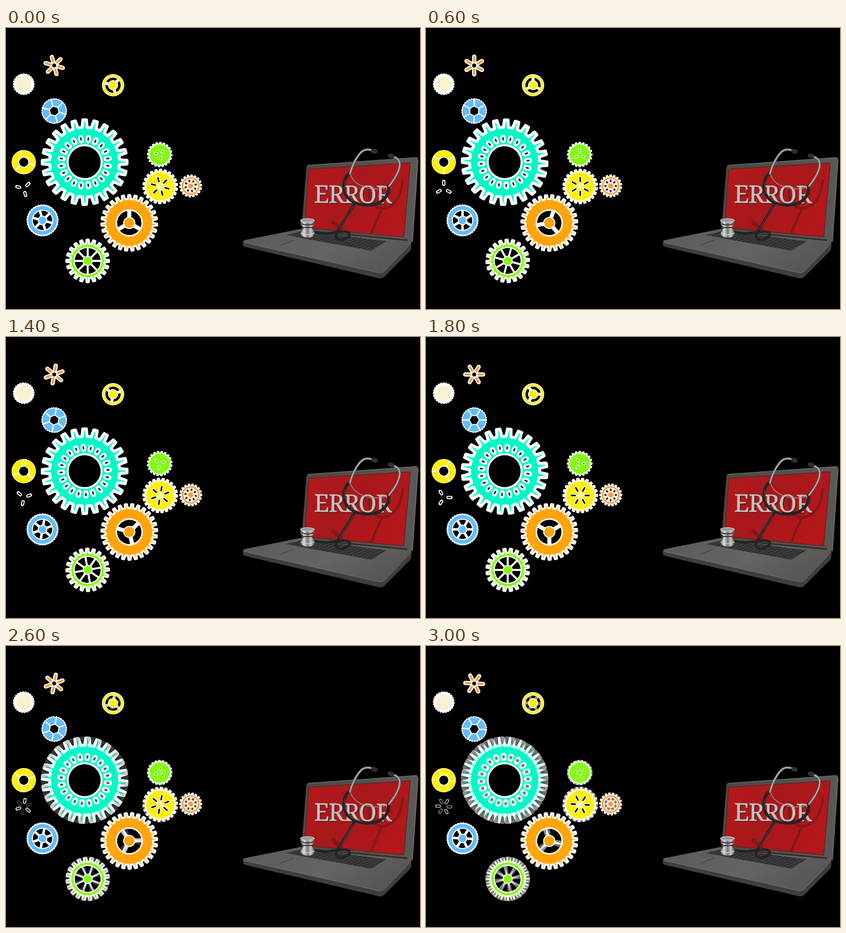
Animation, 816 px wide and 555 px high, one loop 3200 ms. Source, as an HTML page with a canvas:

```html
<!DOCTYPE html>
<html lang="en">
<head>
<meta charset="utf-8">
<title>Gears and laptop</title>
<style>
html, body { margin: 0; width: 100%; height: 100%; overflow: hidden; background: #000; }
canvas, svg { position: absolute; left: 0; top: 0; display: block; }
</style>
</head>
<body>
<canvas id="stage" width="816" height="555"></canvas>
<svg width="816" height="555" viewBox="0 0 816 555" fill="none" stroke-linecap="round" stroke-linejoin="round">
  <defs>
    <linearGradient id="red" x2="1" y2=".5">
      <stop stop-color="#b5191c"/><stop offset=".5" stop-color="#a8181a"/><stop offset="1" stop-color="#b3171a"/>
    </linearGradient>
    <linearGradient id="lid" x2="1"><stop stop-color="#484746"/><stop offset="1" stop-color="#5b5958"/></linearGradient>
    <linearGradient id="base" x2="1" y2=".4"><stop stop-color="#5c5a58"/><stop offset=".6" stop-color="#666462"/><stop offset="1" stop-color="#595755"/></linearGradient>
    <linearGradient id="chrome" x2="1">
      <stop stop-color="#555"/><stop offset=".25" stop-color="#ddd"/><stop offset=".5" stop-color="#777"/>
      <stop offset=".72" stop-color="#c8c8c8"/><stop offset="1" stop-color="#444"/>
    </linearGradient>
    <pattern id="keys" width="9" height="6" patternUnits="userSpaceOnUse" patternTransform="matrix(1 .16 -.9 .42 552 408)">
      <rect width="9" height="6" fill="#4c4a49"/><rect x="1" y="1" width="7.4" height="4.4" fill="#292828"/>
    </pattern>
    <clipPath id="screen"><path d="M597 279L797 266L784 413L589 394Z"/></clipPath>
  </defs>

  <!-- Lid and screen -->
  <path d="M597 270L808 255Q813 255 812 261L801 422L582 402L592 276Q593 271 597 270Z" fill="url(#lid)"/>
  <path d="M812 261L801 422" stroke="#686664" stroke-width="2"/>
  <path d="M594 272L809 256" stroke="#6c6968"/>
  <path d="M597 279L797 266L784 413L589 394Z" fill="url(#red)" stroke="#482020"/>
  <g clip-path="url(#screen)" stroke="#76191a" stroke-width="5" opacity=".75">
    <path d="M716 318C712 352 739 366 762 348C775 338 780 318 782 301"/>
    <path d="M740 358L722 400L716 416"/>
    <path d="M645 384L660 397" stroke-width="8"/>
  </g>

  <!-- Base -->
  <path d="M467 421L467 429Q469 432 474 433L734 494Q741 496 746 491L796 441Q800 437 799 421Z" fill="#403e3d"/>
  <path d="M470 419L580 397L799 420Q799 426 795 429L746 480Q741 485 733 483L470 424Q465 422 470 419Z" fill="url(#base)"/>
  <path d="M470 424L733 483Q741 485 746 480L795 429" stroke="#777572"/>
  <path d="M551 409L588 400L750 421L720 440Z" fill="url(#keys)"/>
  <path d="M541 429L567 419" stroke="#4a4847" stroke-width="1.5"/>
  <path d="M584 400L790 419" stroke="#302f2e" stroke-width="3"/>

  <!-- Lettering -->
  <g font-family="'Noto Serif', 'Liberation Serif', serif" font-size="48" letter-spacing="-1.4" transform="rotate(.5 607 346)">
    <text x="609" y="347" fill="#58191a">ERROR</text>
    <text x="607" y="345" fill="#c5c0bf" stroke="#c5c0bf" stroke-width=".5">ERROR</text>
  </g>

  <!-- Stethoscope -->
  <path d="M679 289Q686 311 718 317Q744 320 755 311" stroke="#98908f" stroke-width="1.5"/>
  <g stroke="#242425" stroke-width="6">
    <path d="M676 288C661 302 664 327 677 338C693 352 724 353 739 343C751 335 755 323 754 311"/>
    <path d="M687 347L654 401C645 414 654 421 667 417C681 411 681 402 666 402C647 402 628 410 609 403" stroke-width="5"/>
  </g>
  <path d="M668 302C665 324 675 342 702 347M684 353L657 397" stroke="#555" stroke-width="1"/>
  <g stroke="#555455" stroke-width="5">
    <path id="pipes" d="M722 242C707 236 699 244 691 257C683 270 680 280 678 288M762 254C775 257 778 265 775 277C772 288 764 301 755 312"/>
  </g>
  <use href="#pipes" stroke="#b3aeae" stroke-width="2.5"/>
  <path d="M724 243L728 244M757 252L761 253" stroke="#303030" stroke-width="9"/>
  <path d="M580 380Q582 377 594 377Q607 377 608 380L607 389L602 394L609 405Q607 414 595 414Q581 413 580 405L588 394L581 389Z" fill="url(#chrome)"/>
  <ellipse cx="594" cy="380" rx="14" ry="3.5" fill="#999" stroke="#ddd"/>
  <path d="M588 394L602 394" stroke="#333" stroke-width="2"/>
  <path d="M582 405Q594 412 607 405" stroke="#d4d4d4" stroke-width="1.5"/>
  <path d="M583 387Q594 391 606 387" stroke="#333" stroke-width="2"/>
</svg>

<script>
const LOOP = 3200, STEP = 200, TAU = Math.PI * 2;
const WHITE = '#fff', BLACK = '#000', TEAL = '#00f7c7', ORANGE = '#ffa408',
  YELLOW = '#fff000', BLUE = '#62bcff', GREEN = '#83fa12', AMBER = '#ff9a38';
const view = document.getElementById('stage').getContext('2d');
const buffer = document.createElement('canvas');
buffer.width = 816;
buffer.height = 555;
const ctx = buffer.getContext('2d');

// Tick and angle of the small wheels.
const TURNS = [[0, 75], [3, -90], [7, -260], [9, -360], [11, -455], [13, -560], [15, -657]];

function wheelAngle(tick) {
  if (tick < 0) return 75 - 48.8 * tick;
  let i = 1;
  while (i < TURNS.length - 1 && TURNS[i][0] < tick) i++;
  const [t0, a0] = TURNS[i - 1], [t1, a1] = TURNS[i];
  return a0 + (a1 - a0) * (tick - t0) / (t1 - t0);
}

function place(x, y, degrees, draw) {
  ctx.save();
  ctx.translate(x, y);
  ctx.rotate(degrees * TAU / 360);
  draw();
  ctx.restore();
}

function disc(r, color) {
  ctx.beginPath();
  ctx.arc(0, 0, r, 0, TAU);
  ctx.fillStyle = color;
  ctx.fill();
}

function cog(n, root, tip, line, fill, edge = WHITE) {
  const pitch = TAU / n;
  ctx.beginPath();
  for (let i = 0; i < n; i++) {
    for (const [r, k] of [[root, -.27], [tip, -.16], [tip, .16], [root, .27]]) {
      const a = (i + k) * pitch;
      ctx.lineTo(r * Math.cos(a), r * Math.sin(a));
    }
  }
  ctx.closePath();
  ctx.lineJoin = 'round';
  ctx.lineWidth = line;
  ctx.strokeStyle = edge;
  ctx.fillStyle = fill;
  ctx.fill();
  ctx.stroke();
}

// Radial bars from r0 to r1.
function bars(n, r0, r1, width, color, cap = 'round') {
  ctx.lineCap = cap;
  ctx.lineWidth = width;
  ctx.strokeStyle = color;
  ctx.beginPath();
  for (let i = 0; i < n; i++) {
    const c = Math.cos(i * TAU / n), s = Math.sin(i * TAU / n);
    ctx.moveTo(r0 * c, r0 * s);
    ctx.lineTo(r1 * c, r1 * s);
  }
  ctx.stroke();
}

function hexagon(r, color, line) {
  ctx.beginPath();
  for (let i = 0; i < 6; i++) ctx.lineTo(r * Math.cos(i * TAU / 6), r * Math.sin(i * TAU / 6));
  ctx.closePath();
  ctx.fillStyle = color;
  ctx.fill();
  ctx.lineWidth = line;
  ctx.strokeStyle = WHITE;
  ctx.stroke();
}

function spoked(n, r, hub, width, hubColor) {
  disc(r, BLACK);
  bars(n, 0, r + 1, width, WHITE, 'butt');
  disc(hub + 2, WHITE);
  disc(hub, hubColor);
}

function drawGears(tick) {
  const small = wheelAngle(tick);
  ctx.clearRect(0, 0, 816, 555);

  place(95, 74, small, () => {
    bars(6, 8, 17.5, 8.5, WHITE);
    bars(6, 8, 17, 4.2, AMBER);
    hexagon(5.5, BLACK, 2);
  });
  place(35, 111, small, () => {
    cog(24, 19, 20.5, 2, WHITE);
    disc(15.5, '#f8f1d4');
  });
  place(211, 113, small, () => {
    disc(22, '#fff9a8');
    disc(20, '#fbe92c');
    disc(16.5, '#fff9a8');
    spoked(3, 15, 8, 6, YELLOW);
  });
  place(95, 164, small, () => {
    cog(30, 24, 25, 1, WHITE);
    disc(23, BLUE);
    bars(6, 9, 24, 2.5, WHITE, 'butt');
    hexagon(10, BLACK, 2);
  });
  place(155, 265, -90 - 4.3 * tick, () => {
    cog(24, 69, 83.5, 6, TEAL);
    ctx.rotate(TAU / 40);
    bars(20, 43, 49, 10.5, WHITE);
    bars(20, 44.5, 48, 3.2, '#10302c');
    disc(35.5, WHITE);
    disc(31.5, BLACK);
  });
  place(35, 265, small + 60, () => {
    disc(24, '#fff7a0');
    disc(22.5, YELLOW);
    bars(3, 9, 24, 2.5, WHITE, 'butt');
    disc(11, WHITE);
    disc(9, BLACK);
  });
  place(35, 317, small, () => {
    bars(3, 8.5, 14, 6.5, WHITE);
    bars(3, 8.5, 13.5, 2.6, BLACK);
  });
  place(72, 380, small, () => {
    cog(36, 30, 31, 1.5, WHITE);
    disc(28.5, BLUE);
    disc(21, WHITE);
    spoked(6, 19, 7.5, 5, BLUE);
  });
  place(243, 385, -90 + 6.6 * tick, () => {
    cog(27, 47, 55, 4, ORANGE);
    disc(27, WHITE);
    spoked(3, 24, 10, 8, ORANGE);
  });
  place(161, 460, -90 + 5 * tick, () => {
    cog(20, 34, 42, 4, GREEN);
    disc(28, WHITE);
    spoked(8, 25.5, 8, 4, GREEN);
  });
  place(303, 250, small, () => {
    cog(20, 21, 24, 2.5, GREEN);
    bars(3, 6, 10, 5, '#e8ffd0');
    bars(3, 6.5, 9.5, 2, '#5f9b2c');
  });
  place(304, 313, small, () => {
    cog(22, 29, 33.5, 3.5, YELLOW);
    bars(6, 9, 18, 6, '#fffbd0');
    bars(6, 10, 17.5, 3, BLACK);
    disc(6, '#fff3a0');
  });
  place(364, 312, small, () => {
    cog(18, 18, 21.5, 2.5, '#fff4e8');
    ctx.beginPath();
    ctx.arc(0, 0, 16, 0, TAU);
    ctx.lineWidth = 3;
    ctx.strokeStyle = AMBER;
    ctx.stroke();
    bars(8, 9.5, 11, 3.5, '#38261c');
    disc(5, AMBER);
  });
}

function blend(tick, alpha) {
  drawGears(tick);
  view.globalAlpha = alpha;
  view.drawImage(buffer, 0, 0);
}

let shown = -1;
function frame(now) {
  const tick = Math.floor(now % LOOP / STEP);
  if (tick !== shown) {
    shown = tick;
    const fade = tick < 12 ? 0 : .1 + .11 * (tick - 12);
    view.globalCompositeOperation = 'source-over';
    view.globalAlpha = 1;
    view.fillStyle = BLACK;
    view.fillRect(0, 0, 816, 555);
    view.globalCompositeOperation = 'lighter';
    blend(tick, 1 - fade);
    if (fade) blend(tick - 16, fade);
  }
  requestAnimationFrame(frame);
}
frame(0);
</script>
</body>
</html>
```
